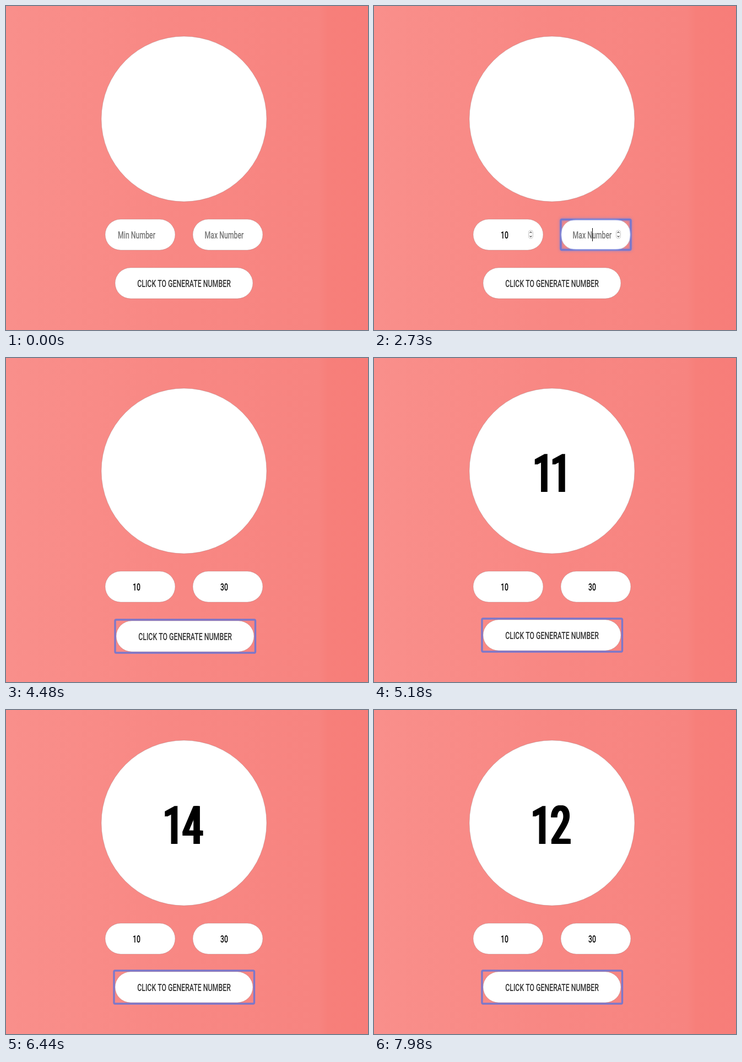
These frames come from a looping animation (657x588 px, 8000 ms). An HTML page with a canvas:

```html
<!DOCTYPE html>
<html lang="en">
<head>
<meta charset="utf-8">
<title>Number generator</title>
<style>
  html, body { margin: 0; width: 100%; height: 100%; overflow: hidden; background: #f88581; }
  canvas { display: block; width: 657px; height: 588px; }
</style>
</head>
<body>
<canvas id="stage" width="657" height="588"></canvas>
<script>
const W = 657, H = 588, LOOP = 8000;
const FACE = 'Roboto, "Liberation Sans", sans-serif';
const CONDENSE = 0.677; // one narrow setting shared by all text

const MIN = { x: 180, hint: 'Min Number', focus: [910, 2450], hover: [700, 3500],
              typed: [[1820, '1'], [2030, '10']] };
const MAX = { x: 339, hint: 'Max Number', focus: [2450, 4340], hover: [2450, 4130],
              typed: [[3290, '3'], [3500, '30']] };
const PRESSES = [[4340, 4620], [5740, 5880], [7000, 7140]];
const RESULTS = [[4620, '11'], [5880, '14'], [7140, '12']];

const ctx = document.getElementById('stage').getContext('2d');
const within = (t, [from, to]) => t >= from && t < to;
const latest = (t, steps) => steps.reduce((now, [at, text]) => t >= at ? text : now, '');

// gentle slope with a visible band near the right edge
const backdrop = ctx.createLinearGradient(0, 0, W, 0);
backdrop.addColorStop(0, '#f98f8b');
backdrop.addColorStop(0.5, '#f88783');
backdrop.addColorStop(0.865, '#f78480');
backdrop.addColorStop(0.89, '#f77f7a');
backdrop.addColorStop(1, '#f77d79');

function label(text, x, y, size, color, smear = 0) {
  ctx.save();
  ctx.translate(x, y);
  ctx.scale(CONDENSE, 1);
  ctx.font = `500 ${size}px ${FACE}`;
  ctx.textAlign = 'center';
  ctx.fillStyle = color;
  // sideways copies thicken the upright strokes
  for (let d = -smear; d <= smear; d += smear || 1) ctx.fillText(text, d / CONDENSE, 0);
  ctx.restore();
}

function shape(x, y, w, h, r) {
  ctx.beginPath();
  ctx.roundRect(x, y, w, h, r);
  ctx.fillStyle = '#fff';
  ctx.fill();
  ctx.strokeStyle = 'rgba(150,120,125,0.42)';
  ctx.lineWidth = 0.8;
  ctx.stroke();
}

function ring(x, y, w, h, glow) {
  ctx.save();
  if (glow) {
    ctx.shadowColor = 'rgba(90,130,240,0.75)';
    ctx.shadowBlur = 5;
  }
  ctx.strokeStyle = 'rgba(108,118,212,0.88)';
  ctx.lineWidth = 3.4;
  ctx.beginPath();
  ctx.roundRect(x, y, w, h, 2);
  ctx.stroke();
  ctx.restore();
}

function spinner(x, y) {
  ctx.beginPath();
  ctx.roundRect(x - 4, y - 7.5, 8, 15, 4);
  ctx.fillStyle = '#fff';
  ctx.fill();
  ctx.strokeStyle = '#bcbcbc';
  ctx.lineWidth = 0.8;
  ctx.stroke();
  ctx.beginPath();
  for (const s of [-1, 1]) {
    ctx.moveTo(x - 2, y + s * 2.5);
    ctx.lineTo(x, y + s * 4.7);
    ctx.lineTo(x + 2, y + s * 2.5);
  }
  ctx.strokeStyle = '#444';
  ctx.lineWidth = 1.1;
  ctx.stroke();
}

function field(t, { x, hint, focus, hover, typed }) {
  const value = latest(t, typed);
  const mid = x + 57;
  const active = within(t, focus);
  shape(x, 387, 127, 56, 28);
  if (active) {
    ring(x, 387.5, 127, 55, true);
    // the focus colour washes out over the white pill
    ctx.save();
    ctx.beginPath();
    ctx.roundRect(x + 1.5, 389, 124, 52, 26);
    ctx.fillStyle = ctx.shadowColor = '#fff';
    ctx.shadowBlur = 3;
    ctx.fill();
    ctx.restore();
  }
  label(value || hint, mid, 421.5, 18.2, value ? '#000' : '#757575');
  if (within(t, hover)) spinner(x + 104.5, 414.5);
  if (active) {
    const since = typed.reduce((last, [at]) => t >= at ? at : last, focus[0]);
    if ((t - since) % 1000 < 500) {
      ctx.fillStyle = '#000';
      ctx.fillRect(mid + value.length * 3.6, 403, 1, 24);
    }
  }
}

function button(t) {
  const push = PRESSES.some(span => within(t, span)) ? 2 : 0;
  shape(198 + push, 475 + push, 250, 56, 28);
  if (t >= PRESSES[0][0]) ring(196 + push, 473 + push, 254.5, 60, false);
  label('CLICK TO GENERATE NUMBER', 323 + push, 510 + push, 18.2, '#333');
}

function result(text) {
  const advance = digit => digit === '1' ? 32 : 39;
  let x = 323;
  for (const digit of text) x -= advance(digit) / 2;
  for (const digit of text) {
    label(digit, x + advance(digit) / 2, 242.5, 95.6, '#000', 2);
    x += advance(digit);
  }
}

function draw(t) {
  ctx.fillStyle = backdrop;
  ctx.fillRect(0, 0, W, H);
  shape(173, 55, 300, 300, 150);
  result(latest(t, RESULTS));
  field(t, MIN);
  field(t, MAX);
  button(t);
}

const start = performance.now();
function frame() {
  draw((performance.now() - start) % LOOP);
  requestAnimationFrame(frame);
}
frame();
</script>
</body>
</html>
```
